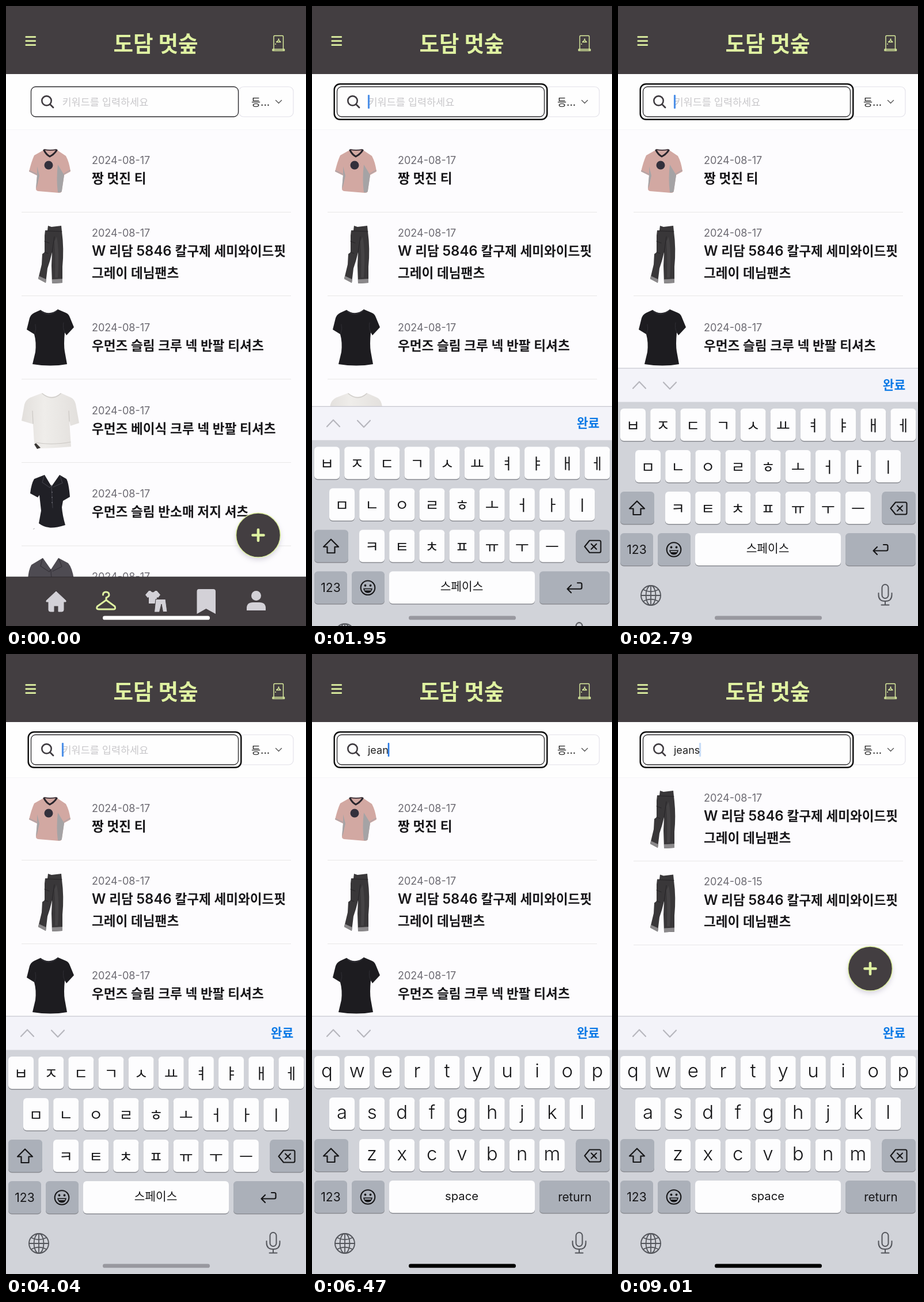
An HTML page that plays this animation: 521 by 1075 pixels, repeating every 9.03 s.

```html
<!DOCTYPE html>
<html lang="ko">
<head>
<meta charset="utf-8">
<title>Wardrobe search</title>
<style>
html, body { margin: 0; width: 100%; height: 100%; overflow: hidden; background: #fdfcfe; }
svg { display: block; width: 100%; height: 100%; }
text { font-family: Inter, 'Noto Sans CJK KR', sans-serif; white-space: pre; }
.mid { text-anchor: middle; }
.line { fill: none; stroke-linecap: round; stroke-linejoin: round; }
.kb { animation: rise 9.03s infinite; }
.keys { animation: settle 9.03s step-end infinite; }
.lang { animation: fadeOut 9.03s linear infinite; }
.space { animation: fadeIn 9.03s linear infinite; }
.bar { animation: tint 9.03s linear infinite; }
.fab { animation: lift 9.03s step-end infinite; }
.caret { animation: hop 9.03s step-end infinite; }
.caret rect { animation: blink 9.03s linear infinite; }
@keyframes rise {
  0% { transform: translateY(448px); }
  19.49% { transform: translateY(448px); animation-timing-function: cubic-bezier(.38, .7, .125, 1); }
  25.03%, 100% { transform: translateY(0); }
}
@keyframes settle { 0% { transform: translateY(1px); } 47.619%, 100% { transform: translateY(0); } }
@keyframes fadeOut { 0%, 63.12% { opacity: 1; } 66.45%, 100% { opacity: 0; } }
@keyframes fadeIn { 0%, 63.12% { opacity: 0; } 66.45%, 100% { opacity: 1; } }
@keyframes tint {
  0%, 19.93% { fill: #fff; }
  21.37%, 52.05% { fill: #98989f; }
  63.96%, 100% { fill: #000; }
}
@keyframes lift { 0% { transform: translateY(0); } 88.594%, 100% { transform: translateY(-372px); } }
</style>
</head>
<body>
<svg id="stage" viewBox="0 0 521 1075" preserveAspectRatio="none"></svg>
<script>
const LOOP = 9030, FOCUS = 1740, SWITCH = 4300, RESULT = 8000;
const TYPED = [['j', 4756, 102.5], ['e', 5150, 113], ['a', 5800, 123], ['n', 6450, 133], ['s', 7280, 142.5]];
const DARK = '#433e41', LIME = '#dff2a1', PALE = '#d3d1d7';
let css = '';

const pct = ms => (ms / LOOP * 100).toFixed(3) + '%';

// Visible from a to b (ms), hidden otherwise
function during(a, b = LOOP) {
  const id = `on${a}to${b}`;
  if (!css.includes(id)) {
    css += `@keyframes ${id}{` + (a ? '0%{visibility:hidden}' : '') + `${pct(a)}{visibility:visible}` +
      (b < LOOP ? `${pct(b)}{visibility:hidden}` : '') + '}';
  }
  return `style="animation:${id} ${LOOP}ms step-end infinite"`;
}

// Latin runs are set slightly larger than Hangul
function text(x, y, size, str, attrs = '') {
  const rich = /[가-힣]/.test(str)
    ? str.replace(/[\w.-]+/g, m => `<tspan font-size="${(size * 1.06).toFixed(2)}">${m}</tspan>`) : str;
  return `<text x="${x}" y="${y}" font-size="${size}" ${attrs}>${rich}</text>`;
}
const path = (d, fill, attrs = '') => `<path d="${d}" fill="${fill}" ${attrs}/>`;
const line = (d, color, w, attrs = '') => `<path class="line" d="${d}" stroke="${color}" stroke-width="${w}" ${attrs}/>`;
const rect = (x, y, w, h, r, fill, attrs = '') =>
  `<rect x="${x}" y="${y}" width="${w}" height="${h}" rx="${r}" fill="${fill}" ${attrs}/>`;
const circle = (x, y, r, fill, attrs = '') => `<circle cx="${x}" cy="${y}" r="${r}" fill="${fill}" ${attrs}/>`;
const group = (body, attrs = '') => `<g ${attrs}>${body}</g>`;

const art = {
  pink: path('M65 250L49 259Q44 270 40 287L54 294L52 317Q52 320 56 321L92 324Q97 324 97 320L101 293L112 287Q110 271 104 260L89 250Q83 249 76 249Z', '#d2a8a2')
    + path('M90 275L101 293L97 320Q97 324 90 323Q87 300 90 275Z', '#a5a3a5')
    + path('M54 278L58 294L54 312L52 317L54 294Z', '#a5a3a5')
    + line('M41 286L54 292M101 291L111 285', '#b5a5a6', 2)
    + line('M66 250Q70 258 76 261Q84 257 88 250', '#29252c', 3)
    + line('M67 249Q76 251 87 249', '#4a3c42', 2)
    + circle(74, 276, 7.5, '#33303c'),
  jeans: path('M73 381L79 383L96 381L97 391Q101 421 98 452L98 480L80 481L79 450L80 427Q77 441 72 455L69 480L56 473L62 448L63 430L67 427L67 398L68 389L72 389Z', '#393739')
    + path('M88 400Q93 424 90 471L85 471Q86 430 84 408Z', '#454345')
    + path('M57 468L70 474L69 480L56 473ZM80 474L98 473L98 480L80 481Z', '#8b898b')
    + line('M72 390L97 391M80 427L84 400M67 408L75 411M67 427L73 429', '#262427', 1),
  black: path('M60 527Q75 538 90 526L104 532Q109 534 111 540L118 557L105 571L102 566Q100 588 102 599L106 621Q78 626 46 621L51 600Q53 583 49 569L36 561L41 541Q43 535 49 532Z', '#1d1c20')
    + line('M61 529Q75 540 90 527', '#34333a', 1.2) + line('M102 566Q98 558 100 549M50 568Q53 560 51 552', '#302f35', 1),
  white: path('M63 671Q80 684 95 671L113 679Q119 682 121 690L127 723L112 728L110 720L113 764Q82 767 55 767L49 758L47 725L27 719L32 691Q34 683 42 679Z', 'url(#cloth)')
    + line('M63 672Q80 686 95 672', '#cfccc9', 1.3)
    + line('M47 724L46 702M110 720L109 702M52 757Q80 762 112 756', '#cbc8c4', 1.2)
    + path('M49 760L54 768L60 766L52 758Z', '#3a3735'),
  polo: path('M67 813L79 833L93 813L105 820Q109 827 111 851L99 858L97 869Q98 883 103 900Q83 906 74 904Q65 903 57 897L61 875L58 848L55 852L42 845Q44 828 49 820Z', '#202026')
    + line('M66 815L63 826L76 835L79 831M94 815L98 827L82 834M79 833L81 870', '#3d3d45', 1.2)
    + [843, 852, 861].map(y => circle(80, y, 1, '#6a6a72')).join('') + line('M48 907L49 906', '#777', 1),
  gray: path('M64 957L78 977L91 957L108 966Q115 974 118 994L38 994Q39 978 44 969Z', '#4e4b52')
    + line('M63 959L60 971L75 981L78 977M92 959L97 972L81 980M78 979L79 994', '#37343b', 1.3)
};

// mid is the vertical centre of the date line
function item(mid, pic, lines, rule, date = '2024-08-17') {
  return pic + text(149, mid + 6.5, 18, date, 'fill="#6c6a72"')
    + lines.map((s, i) => text(149, mid + 40.3 + i * 37.3, 22.6, s, 'font-weight="600" fill="#171619"')).join('')
    + (rule ? rect(27, rule, 468, 1, 0, '#e8e7e8') : '');
}

const jeansName = ['W 리담 5846 칼구제 세미와이드핏', '그레이 데님팬츠'];
const allItems = item(267, art.pink, ['짱 멋진 티'], 357)
  + item(393, art.jeans, jeansName, 502)
  + item(557, art.black, ['우먼즈 슬림 크루 넥 반팔 티셔츠'], 646.5)
  + item(701, art.white, ['우먼즈 베이식 크루 넥 반팔 티셔츠'], 791)
  + item(845, art.polo, ['우먼즈 슬림 반소매 저지 셔츠'], 935.5)
  + item(989, art.gray, []);
const found = item(249, group(art.jeans, 'transform="translate(0 -144)"'), jeansName, 358.5)
  + item(394.5, group(art.jeans, 'transform="translate(0 1.5)"'), jeansName, 504, '2024-08-15');

const header = rect(0, 0, 521, 118, 0, DARK)
  + [53.7, 60.7, 67.7].map(y => rect(33.5, y - 1.4, 18.5, 2.8, 1, LIME)).join('')
  + text(260, 79, 37.6, '도담 멋숲', `class="mid" font-weight="700" fill="${LIME}"`)
  + line('M465 76V53Q465 51.5 466.5 51.5H480Q481.5 51.5 481.5 53V76M463 77.5H483.5V75H463Z', LIME, 1.4)
  + line('M473 57.5Q474.5 56 473.5 59L477 62.5H469.5L473.5 59', LIME, 1.3) + circle(468, 66, 1, LIME);

const letters = TYPED.map(([c, t]) => `<tspan ${during(t)}>${c}</tspan>`).join('');
const search = rect(0, 118, 521, 96.5, 0, '#fefefe') + rect(0, 214, 521, 1, 0, '#f5f4f8')
  + rect(404.5, 140, 94.5, 52, 8, '#fefefe', 'stroke="#e3e2e9" stroke-width="1.2"')
  + text(426, 172.5, 17.5, '등...', 'fill="#222"')
  + line('M468.5 163.5L473.5 168.5L478.5 163.5', '#555', 1.4)
  + rect(38.7, 135.2, 369.6, 61.6, 10, '#fefefe', 'stroke="#111" stroke-width="2.5" ' + during(FOCUS))
  + rect(43.5, 140, 360, 52, 8, '#fefefe', 'stroke="#2a292c" stroke-width="1.3"')
  + circle(70.5, 164.3, 8.2, 'none', 'stroke="#3f3b40" stroke-width="2.6"')
  + line('M76.5 170.5L82 176', '#3f3b40', 2.8)
  + group(text(97.5, 172.7, 17.5, '키워드를 입력하세요', 'font-weight="300" fill="#c9c8cb"'), during(0, TYPED[0][1]))
  + `<text x="97" y="172.7" font-size="18" fill="#222">${letters}</text>`
  + group(group(rect(-1.3, 154, 2.6, 24, 1, '#2477e3'), 'class="caret"'), during(FOCUS));

const fab = circle(438, 922, 38, '#8a84a0', 'opacity=".35" filter="url(#soft)"')
  + circle(438, 917.5, 38.5, DARK, `stroke="${LIME}" stroke-width="1.5"`)
  + line('M428.5 917.5H447.5M438 908V927', LIME, 4.6);

const nav = rect(0, 990, 521, 85, 0, DARK) + rect(0, 989.5, 521, 1, 0, '#2f2b2e')
  + path('M87 1015L104 1031V1033H100V1047Q100 1050 97 1050H91V1040H83V1050H77Q74 1050 74 1047V1033H70V1031Z', PALE,
    `stroke="${PALE}" stroke-linejoin="round"`)
  + line('M168.5 1021Q168.5 1016 173.5 1016Q179 1016 179 1021Q179 1024 174 1026V1030L189 1041Q191 1046 187 1046H161Q156 1046 158.5 1041L174 1030', LIME, 3)
  + path('M248 1014H251Q255 1019 259 1014H262L268 1021L264 1026L262 1025V1036H248V1025L246 1026L242 1021Z', PALE)
  + path('M260 1028.500H277L280 1050.500H272.500L270 1037L266.500 1051H257.500Z', PALE, `stroke="${DARK}" stroke-width="1"`)
  + path('M335 1011H360Q364 1011 364 1015V1054L347.5 1045L331.5 1054V1015Q331.5 1011 335 1011Z', PALE)
  + circle(434.5, 1022.5, 8.5, PALE)
  + path('M418 1048V1044Q418 1034 429 1034H440Q451 1034 451 1044V1048Z', PALE);

const INK = '#161618', GREY = '#abb0b9';
const key = (x, y, w, fill = '#fdfdfe') => rect(x, y + 1.5, w, 56, 6, '#8a8c92') + rect(x, y, w, 56, 6, fill);
const rowY = r => 697 + r * 72;
const rowX = [4, 30, 82];
function eachKey(rows, draw) {
  return rows.map((row, r) => [...row].map((c, i) => draw(c, rowX[r] + i * 52.15, rowY(r))).join('')).join('');
}
const latin = ['qwertyuiop', 'asdfghjkl', 'zxcvbnm'];
const hangul = ['ㅂㅈㄷㄱㅅㅛㅕㅑㅐㅔ', 'ㅁㄴㅇㄹㅎㅗㅓㅏㅣ', 'ㅋㅌㅊㅍㅠㅜㅡ'];
const label = (x, y, size, s, attrs = 'class="mid"') => text(x, y, size, s, `${attrs} fill="${INK}"`);

const caps = eachKey(latin, (c, x, y) => key(x, y, 44))
  + key(4, rowY(2), 59, GREY) + key(458.5, rowY(2), 58.5, GREY)
  + key(4, rowY(3), 57, GREY) + key(69, rowY(3), 57, GREY)
  + key(134, rowY(3), 253) + key(395, rowY(3), 122, GREY)
  + line('M33 857.5L46 870.5H39.5V881H26.5V870.5H20Z', INK, 2.2)
  + line('M482 859.5H499Q501.5 859.5 501.5 862V878Q501.5 880.5 499 880.5H482L473.5 870ZM485 865.5L494 874.5M494 865.5L485 874.5', INK, 2.1)
  + label(32.5, 949, 21, '123')
  + circle(97, 941.5, 12.3, 'none', `stroke="${INK}" stroke-width="2.1"`)
  + circle(92.5, 937.5, 1.9, INK) + circle(101.5, 937.5, 1.9, INK)
  + path('M89 942.5H105Q103.5 950.5 97 950.5Q90.5 950.5 89 942.5Z', INK)
  + path('M91.5 944H102.5V946H91.5Z', GREY);
const korean = eachKey(hangul, (c, x, y) => label(x + 22, y + 38.5, 26, c))
  + label(260, 947, 20.3, '스페이스')
  + line('M461 933H466Q468.5 933 468.5 935.5V941Q468.5 943.5 466 943.5H444M450 937L443.5 943.5L450 950', INK, 2.2);
const english = eachKey(latin, (c, x, y) => label(x + 22, y + 37, 33, c, 'class="mid" font-weight="300"'))
  + label(260, 948, 19.6, 'English (US)', 'class="mid lang"')
  + label(260, 947, 20.3, 'space', 'class="mid space"')
  + label(456.5, 949, 20.6, 'return');

const TOOL = '#54565c';
const keyboard = rect(0, 628, 521, 448, 0, '#d1d3d9')
  + rect(0, 628, 521, 58.5, 0, '#f3f3f9') + rect(0, 627.5, 521, 1.2, 0, '#c6c6cf')
  + line('M26 663L37 651.5L48 663M79 652.5L90 664L101 652.5', '#b7b7be', 2.2)
  + text(479.5, 665, 21.5, '완료', 'class="mid" font-weight="600" fill="#0b79e6"')
  + group(caps + group(korean, during(0, SWITCH)) + group(english, during(SWITCH)), 'class="keys"')
  + circle(57, 1022, 17, 'none', `stroke="${TOOL}" stroke-width="1.9"`)
  + `<ellipse cx="57" cy="1022" rx="8.5" ry="17" fill="none" stroke="${TOOL}" stroke-width="1.8"/>`
  + line('M57 1005V1039M40 1022H74M44 1012Q57 1019 70 1012M44 1032Q57 1025 70 1032', TOOL, 1.8)
  + rect(458.5, 1003, 11, 24, 5.5, 'none', `stroke="${TOOL}" stroke-width="2"`)
  + line('M452.5 1018V1021Q452.5 1032 464 1032Q475.5 1032 475.5 1021V1018M464 1032V1038.5M457.5 1038.5H470.5', TOOL, 2);

const defs = '<defs><filter id="soft" x="-30%" y="-30%" width="160%" height="160%"><feGaussianBlur stdDeviation="5"/></filter>'
  + '<linearGradient id="cloth"><stop offset="0" stop-color="#e2dfdc"/><stop offset=".4" stop-color="#efedea"/>'
  + '<stop offset="1" stop-color="#e2dfdc"/></linearGradient></defs>';
document.getElementById('stage').innerHTML = defs
  + rect(0, 0, 521, 1075, 0, '#fdfcfe')
  + group(allItems, during(0, RESULT)) + group(found, during(RESULT))
  + search + header
  + group(fab, 'class="fab"') + nav
  + group(keyboard, 'class="kb"')
  + rect(168, 1057.5, 186, 6.8, 3.4, '#fff', 'class="bar"');

// Caret: hops after each letter, blinks while nothing is typed
css += '@keyframes hop{0%{transform:translateX(98.5px)}'
  + TYPED.map(([, t, x]) => `${pct(t)}{transform:translateX(${x}px)}`).join('') + `100%{transform:translateX(142.5px)}}`;
const wink = t => `${pct(t + 520)}{opacity:1}${pct(t + 830)}{opacity:0}${pct(t + 900)}{opacity:0}${pct(t + 1000)}{opacity:1}`;
css += '@keyframes blink{0%{opacity:1}' + [1756, 2756, 3756, 7280].map(wink).join('')
  + `${pct(8800)}{opacity:1}100%{opacity:.26}}`;

const sheet = document.createElement('style');
sheet.textContent = css;
document.head.append(sheet);
</script>
</body>
</html>
```
